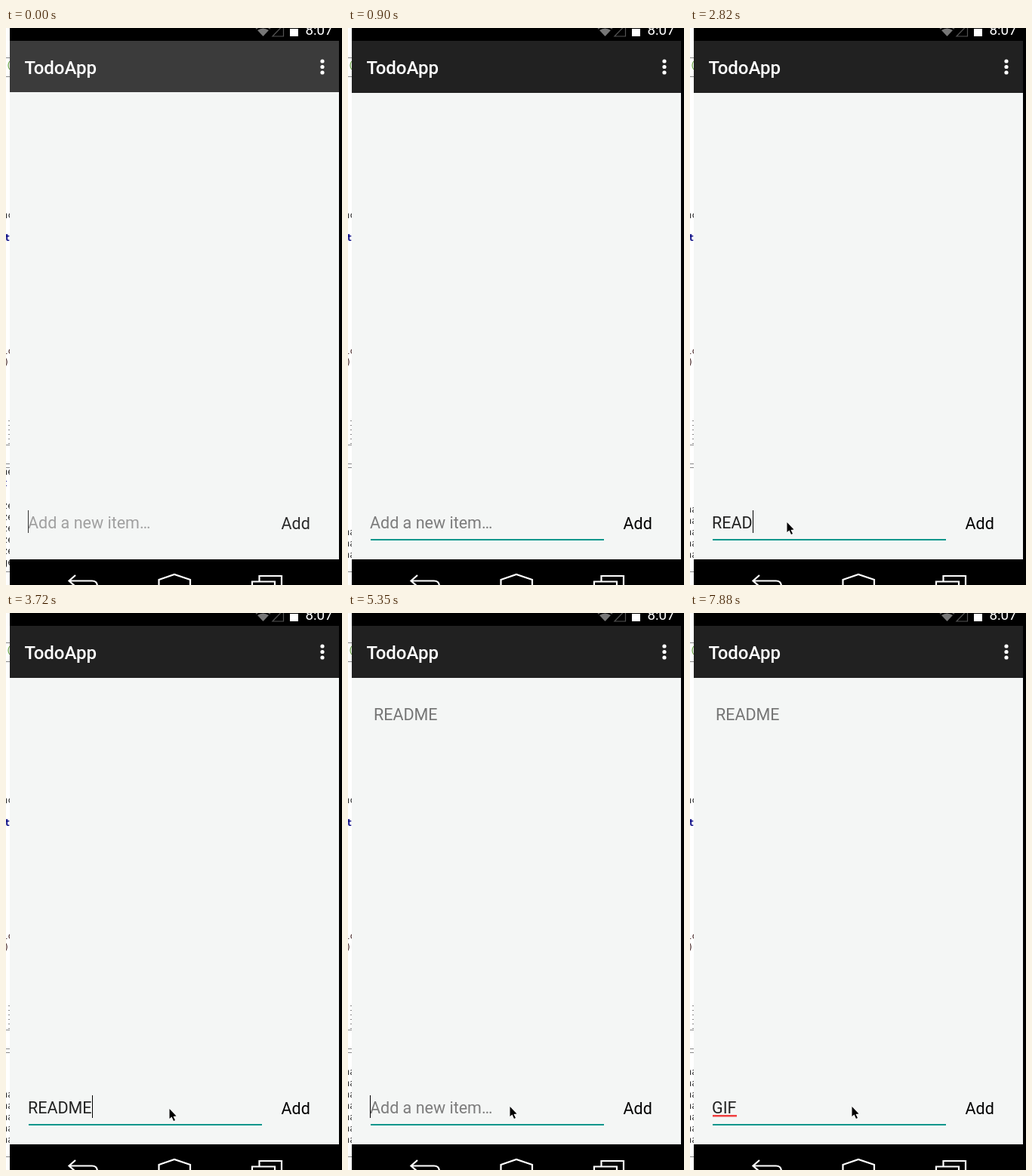
Recreate the animation shown at these times as an HTML page with a canvas. Size 445 by 738 pixels, loop 8000 ms.

```html
<!DOCTYPE html>
<html lang="en">
<head>
<meta charset="utf-8">
<title>TodoApp</title>
<style>
html, body { margin: 0; width: 100%; height: 100%; overflow: hidden; background: #000; }
canvas { display: block; }
</style>
</head>
<body>
<canvas id="stage" width="445" height="738"></canvas>
<script>
const c = document.getElementById('stage').getContext('2d');
const LOOP = 8000, STEP = 148.4;
const UI = 'Roboto, sans-serif', MONO = '"DejaVu Sans Mono", monospace';

const READ_AT = 16, ADDED = 29, GIF_AT = 47, CHECKED = 53;
const BLINK = 3.25;

const clamp = (v, lo, hi) => Math.max(lo, Math.min(hi, v));

function ease(k, from, to) {
  const u = clamp((k - from) / (to - from), 0, 1);
  return u * u * (3 - 2 * u);
}

function rect(color, x, y, w, h) {
  c.fillStyle = color;
  c.fillRect(x, y, w, h);
}

function text(str, x, y, color, size = 21.5, weight = 400, family = UI) {
  c.font = `${weight} ${size}px ${family}`;
  c.fillStyle = color;
  c.fillText(str, x, y);
}

function fill(d, color) {
  c.fillStyle = color;
  c.fill(new Path2D(d));
}

function stroke(d, color, width) {
  c.strokeStyle = color;
  c.lineWidth = width;
  c.stroke(new Path2D(d));
}

function typed(k) {
  if (k >= GIF_AT) return 'GIF'.slice(0, k - GIF_AT + 1);
  if (k < READ_AT || k >= ADDED) return '';
  const pause = k > 19 ? 1 : 0;
  return 'README'.slice(0, k - READ_AT + 1 - pause);
}

// The caret restarts its blinking at every key press and click.
function caretOn(k) {
  const lastInput = k < READ_AT ? -0.3
    : k < ADDED ? Math.min(k, READ_AT + 6)
    : k < GIF_AT ? ADDED
    : Math.min(k, GIF_AT + 2);
  return Math.floor((k - lastInput) / BLINK) % 2 === 0;
}

// Sliver of the editor window behind the phone.
function drawEditor(k) {
  rect('#fff', 0, 0, 5, 738);
  const code = (str, y, color = '#222', weight = 400, x = -5) => text(str, x, y, color, 12, weight, MONO);
  for (const y of [39, 64, 552, 577, 582, 720]) rect('#888', 0, y, 5, 1);
  for (let y = 520; y < 552; y += 6) rect('#888', 3, y, 2, 1);
  code('(', 54, '#5a9a32', 400, 0);
  code('nc', 252);
  code('t', 282, '#000080', 700, -2);
  code('ic', 432, '#402020');
  code(')', 447, '#402020', 400, -3);
  if (k < 1) {
    code('he', 592);
    code('t:', 607, '#000080');
    for (let i = 0; i < 6; i++) code(i < 5 ? 'ze' : 'ge', 637 + 15 * i);
  }
  const rows = clamp(k - 3, 0, 5) + clamp(k - 31, 0, 2);
  for (let i = 0; i < rows; i++) code('na', 702 - 15 * i);
}

function drawSystemBars() {
  rect('#000', 5, 0, 440, 738);
  fill('M333 3 Q340.5 -2 348 3 L340.5 11 Z', '#777');
  stroke('M331 1 Q340.5 -5 350 1', '#666', 1.5);
  stroke('M353 11 H367.5 V-4 Z', '#555', 1.2);
  rect('#fff', 376, 1, 11, 10);
  text('8:07', 396.5, 9, '#fff', 18.8);

  const icons = [
    'M92 725 L83.5 732.5 L92 740 M84 732.5 H114 Q121 732.5 121 740',
    'M202.5 740 V731 L223 724 L244 731 V740',
    'M335.5 733 V726 H365 V740 M326 740 V733.5 H356 V740'
  ];
  for (const icon of icons) stroke(icon, '#fff', 2.2);
}

function drawApp(k) {
  const dim = k < 1;
  rect('#f4f6f5', 5, 17, 436, 687);
  rect(dim ? '#3b3b3b' : '#212121', 5, 17, 436, dim ? 68 : 69);
  text('TodoApp', 24.5, 61, '#fff', 24, 500);
  for (let i = -1; i < 2; i++) {
    c.fillStyle = '#fff';
    c.beginPath();
    c.arc(419, 51.5 + 7.5 * i, 2.6, 0, 7);
    c.fill();
  }
  if (k >= ADDED) text('README', 34, 142, '#757575');

  const str = typed(k);
  text(str || 'Add a new item…', 29, 663, str ? '#222' : dim ? '#a0a0a0' : '#7c7c7c');
  const end = 29 + (str ? Math.round(c.measureText(str).width) : 0);
  if (k >= CHECKED) rect('#f04040', 30, 665, 32, 2.5);
  if (caretOn(k)) rect(dim ? '#333' : '#000', end, 639, 1, 30);
  if (!dim) rect('#0a968c', 30, 677, 309, 2);
  text('Add', 364.5, 664, dim ? '#2a2a2a' : '#000');
}

function drawPointer(k) {
  if (k < 8) return;
  const enter = ease(k, 8, 10), toAdd = ease(k, 23, 28), back = ease(k, 30, 34);
  const x = 114 + 14 * enter + 249 * toAdd - 163 * back;
  const y = 660 - 5 * enter + 7 * toAdd - 8 * back;
  const arrow = 'M.5 0 V13 L3.5 10.5 L6 16 L8 15 L5.5 10 L9.5 9.5 Z';
  c.save();
  c.translate(Math.round(x), Math.round(y));
  stroke(arrow, '#fff', 1);
  fill(arrow, '#000');
  c.restore();
}

function frame(now) {
  const k = Math.floor(now % LOOP / STEP);
  drawEditor(k);
  drawSystemBars();
  drawApp(k);
  drawPointer(k);
  requestAnimationFrame(frame);
}
requestAnimationFrame(frame);
</script>
</body>
</html>
```
